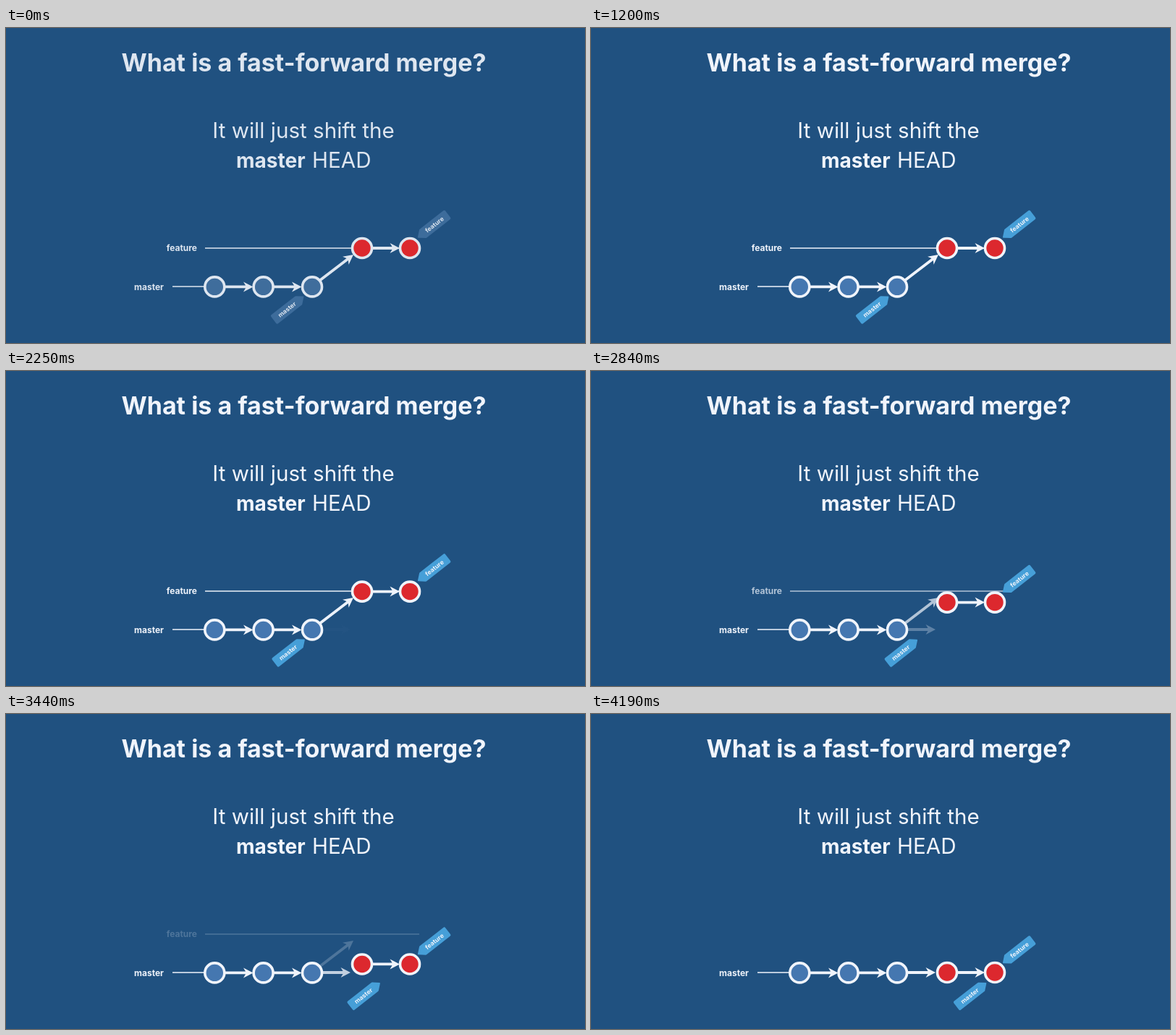
Animation, 800 px wide and 435 px high, one loop 7110 ms. Source, as an HTML page with a canvas:

```html
<!DOCTYPE html>
<html lang="en">
<head>
<meta charset="utf-8">
<title>Fast-forward merge</title>
<style>
  html, body { margin: 0; width: 100%; height: 100%; overflow: hidden; background: #205180; }
  canvas { display: block; }
</style>
</head>
<body>
<canvas id="stage" width="800" height="435"></canvas>
<script>
const ctx = document.getElementById('stage').getContext('2d');
const LOOP = 7110, STEP = 150;
const BG = '#205180', RED = '#dc282e';
const FONT = 'Inter, "Open Sans", sans-serif';
const TILT = -38 * Math.PI / 180;
const MASTER_Y = 357.4, FEATURE_Y = 304, MERGED_Y = 357;

const PALETTES = {
  dull:   { ink: '#dee6f0', node: '#3f6d9c', tag: '#3d6c9b' },
  bright: { ink: '#fafcff', node: '#4480ba', tag: '#4ba3da' },
  calm:   { ink: '#f0f4fb', node: '#4577b0', tag: '#469fd8' }
};

// The picture advances in steps; one of them is 10 ms short.
function stepAt(ms) {
  return Math.min(28, ms < 2840 ? Math.min(18, Math.floor(ms / STEP))
                                : 19 + Math.floor((ms - 2840) / STEP));
}

// cubic-bezier(.42, 0, .58, 1)
function easeInOut(x) {
  if (x <= 0) return 0;
  if (x >= 1) return 1;
  let lo = 0, hi = 1;
  for (let i = 0; i < 24; i++) {
    const s = (lo + hi) / 2, r = 1 - s;
    if (1.26 * r * r * s + 1.74 * r * s * s + s * s * s < x) lo = s; else hi = s;
  }
  return lo * lo * (3 - 2 * lo);
}

function faded(alpha, draw) {
  if (alpha <= 0) return;
  ctx.save();
  ctx.globalAlpha = alpha;
  draw();
  ctx.restore();
}

function text(str, x, y, size, weight, align, color) {
  ctx.font = `${weight} ${size}px ${FONT}`;
  ctx.textAlign = align;
  ctx.fillStyle = color;
  ctx.fillText(str, x, y);
}

function line(x1, x2, y, color) {
  ctx.fillStyle = color;
  ctx.fillRect(x1, y - 0.75, x2 - x1, 1.5);
}

function arrow(x1, y1, x2, y2, color) {
  const len = Math.hypot(x2 - x1, y2 - y1);
  ctx.save();
  ctx.translate(x1, y1);
  ctx.rotate(Math.atan2(y2 - y1, x2 - x1));
  ctx.fillStyle = color;
  ctx.beginPath();
  ctx.moveTo(0, -1.9);
  ctx.lineTo(len - 10.5, -1.9);
  ctx.lineTo(len - 13.5, -7);
  ctx.lineTo(len, 0);
  ctx.lineTo(len - 13.5, 7);
  ctx.lineTo(len - 10.5, 1.9);
  ctx.lineTo(0, 1.9);
  ctx.fill();
  ctx.restore();
}

function node(x, y, fill, ring) {
  ctx.beginPath();
  ctx.arc(x, y, 13.5, 0, Math.PI * 2);
  ctx.fillStyle = fill;
  ctx.fill();
  ctx.lineWidth = 3.6;
  ctx.strokeStyle = ring;
  ctx.stroke();
}

// dir is the side the tip points to: -1 left, 1 right
function tag(label, x, y, dir, pal) {
  const back = -23.5 * dir, neck = 20.5 * dir, tip = 29.5 * dir, h = 7.6;
  ctx.save();
  ctx.translate(x, y);
  ctx.rotate(TILT);
  ctx.beginPath();
  ctx.moveTo(0, -h);
  ctx.arcTo(neck, -h, tip, 0, 2);
  ctx.arcTo(tip, 0, neck, h, 1);
  ctx.arcTo(neck, h, 0, h, 2);
  ctx.arcTo(back, h, back, 0, 2);
  ctx.arcTo(back, -h, 0, -h, 2);
  ctx.closePath();
  ctx.fillStyle = pal.tag;
  ctx.fill();
  text(label, 0, 3, 8.5, 700, 'center', pal.ink);
  ctx.restore();
}

function draw(ms) {
  const n = stepAt(ms);
  const pal = n < 1 ? PALETTES.dull : n < 8 ? PALETTES.bright : PALETTES.calm;
  const { ink } = pal;
  const p = easeInOut((n - 14) / 13.3);
  const y = FEATURE_Y + (MERGED_Y - FEATURE_Y) * p;

  ctx.fillStyle = BG;
  ctx.fillRect(0, 0, 800, 435);

  text('What is a fast-forward merge?', 411.5, 60, 34, 700, 'center', ink);
  text('It will just shift the', 411, 152, 29.6, 400, 'center', ink);
  text('master', 318, 193, 28, 700, 'left', ink);
  text('HEAD', 504.5, 193, 29.6, 400, 'right', ink);

  faded(1 - p, () => {
    text('feature', 264, 308, 12, 700, 'right', ink);
    line(275, 571, FEATURE_Y, ink);
    arrow(433, 349, 480, 313, ink);
  });
  faded(p, () => arrow(436, MERGED_Y, 476, MERGED_Y, ink));

  text('master', 218, 361.5, 12, 700, 'right', ink);
  line(230, 275, MERGED_Y, ink);
  arrow(301, MASTER_Y, 341.5, MASTER_Y, ink);
  arrow(369, MASTER_Y, 408.5, MASTER_Y, ink);
  for (const x of [288.3, 355.6, 423]) node(x, MASTER_Y, pal.node, ink);

  arrow(505, y, 544, y, ink);
  tag('feature', 592, 271.5 + 54.5 * p, -1, pal);
  tag('master', 388.3 + 135 * p, 388.8 + 0.5 * p, 1, pal);
  for (const x of [492, 558]) node(x, y, RED, ink);
}

const start = performance.now();
function frame() {
  draw((performance.now() - start) % LOOP);
  requestAnimationFrame(frame);
}
frame();
</script>
</body>
</html>
```
